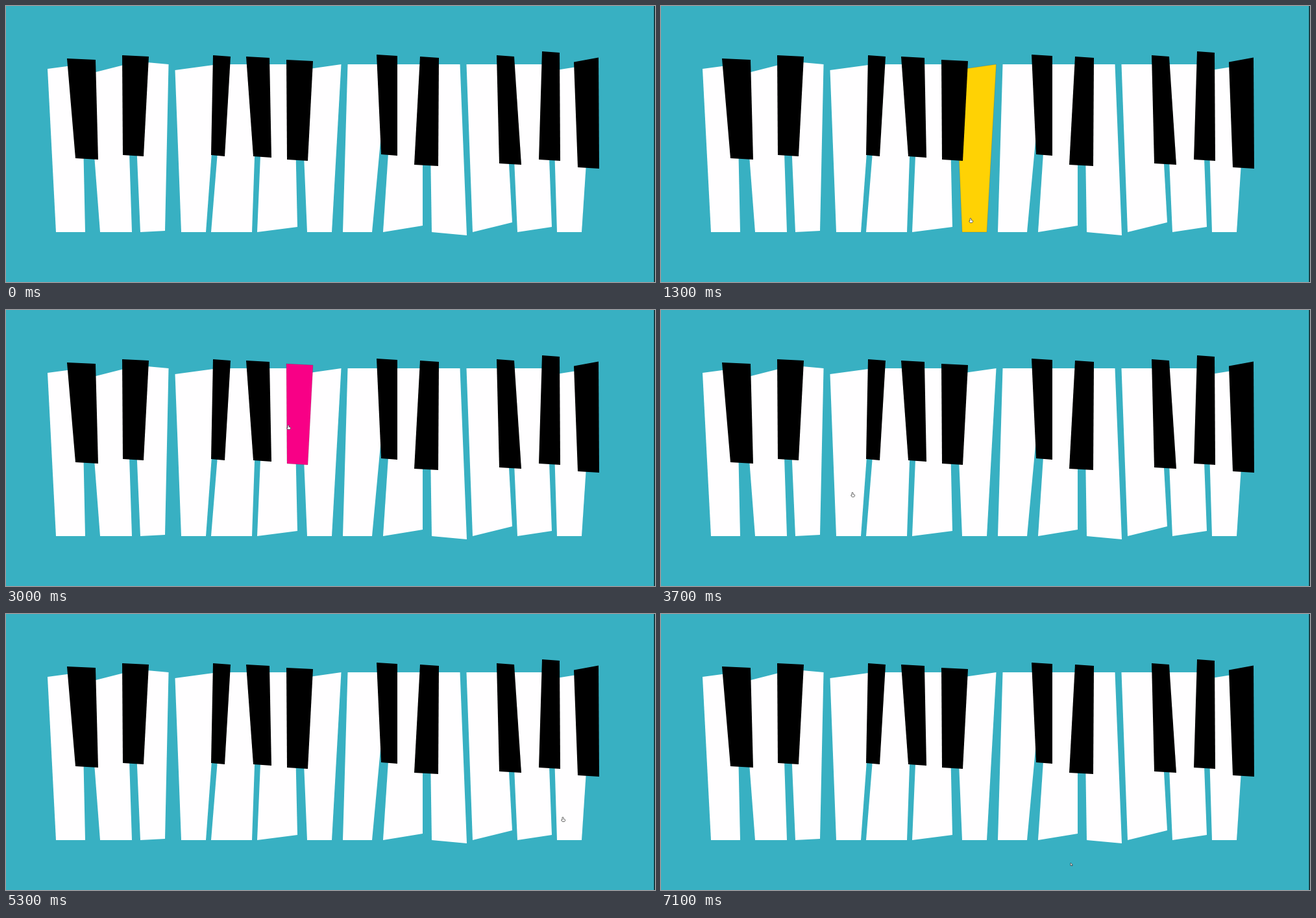
These frames come from a looping animation (1000x426 px, 7200 ms). An HTML page with a canvas:

```html
<!DOCTYPE html>
<html lang="en">
<head>
<meta charset="utf-8">
<title>Paper piano</title>
<style>
html, body { margin: 0; height: 100%; overflow: hidden; background: #38b0c2; }
canvas { display: block; }
</style>
</head>
<body>
<canvas id="stage" width="1000" height="426"></canvas>
<script>
const ctx = document.getElementById('stage').getContext('2d');
const LOOP = 7200, STEP = 100;
const TOP = 90, BOTTOM = 349, TOP_GAP = 10;

const polygon = (...points) => new Path2D(`M${points}Z`);

// Cuts between white keys: top x, bottom x, bottom gap,
// then the top and bottom tilt of the key to the right
const seams = [
  [59, 77, 0, 7],
  [121.5, 133.5, 23, 15],
  [190.5, 200.5, 13, -5, 2],
  [255.5, 257.5, 25, 9],
  [332, 312, 8],
  [393, 383, 8, 0, 8],
  [448.5, 456.5, 15, 9],
  [521.5, 510.5, 17],
  [593, 572.5, 17, 0, 10],
  [647, 649, 14, 0, -5],
  [704.5, 714.5, 9, 0, 15],
  [771.5, 784, 8, 0, 8],
  [836.5, 845, 8, 10],
  [909, 887, 0]
];

const whites = seams.slice(0, -1).map(([top, bottom, gap, tilt = 0, slant = 0], i) => {
  const [nextTop, nextBottom, nextGap] = seams[i + 1];
  return polygon(
    top + TOP_GAP / 2, TOP + tilt,
    nextTop - TOP_GAP / 2, TOP,
    nextBottom - nextGap / 2, BOTTOM - slant,
    bottom + gap / 2, BOTTOM
  );
});

// Black keys: x, y, top width, shift of the foot, foot width, top tilt
const blacks = [
  [94, 82, 44, 13, 35],
  [179, 77, 41, 1, 32],
  [319, 77, 27, -3, 21],
  [370, 79, 36, 11, 28],
  [432, 84, 41, 1, 32],
  [571, 76, 32, 7, 25],
  [638, 79, 29, -9, 37],
  [756, 77, 27, 4, 34],
  [826, 71, 27, -5, 33],
  [875, 83, 38, 6, 33, -7]
].map(([x, y, width, shift, foot, tilt = 2], i) => {
  const end = y + (i < 6 ? 154 : 167);
  return polygon(
    x, y - tilt / 2,
    x + width, y + tilt / 2,
    x + shift + foot, end + 1,
    x + shift, end - 1
  );
});

// Pointer stops: arrival time, x, y, rest, how long the pressed key glows
const stops = [
  [100, 560, 423, 0],
  [500, 477, 328, 1300, 1800],
  [2100, 450, 323, 0],
  [2700, 435, 178, 600, 800],
  [3900, 225, 334, 200, 800],
  [4300, 327, 335, 0],
  [5300, 858, 314, 700],
  [6900, 631, 384, 300]
];

const hand = new Path2D('M-1,0Q0,-1 1,0V2.5L3,3Q4,3 3.5,5L2.5,6.5H-.8L-2.5,4Q-2.5,3 -1,4Z');
const arrow = new Path2D('M0,0V4.5L1.2,3.5L2,5L2.8,4.6L2.1,3.1H3.4Z');

const keyAt = (x, y) => [...blacks, ...whites].find(key => ctx.isPointInPath(key, x, y));

function litKey(t) {
  const press = stops.find(([time, , , , glow = 0]) => t >= time && t < time + glow);
  return press && keyAt(press[1], press[2]);
}

function pointerAt(t) {
  const i = stops.findLastIndex(stop => stop[0] <= t);
  const [t0, x0, y0, rest] = stops[i];
  const [t1, x1, y1] = stops[i + 1] || [LOOP + rest, x0, y0];
  const p = Math.max(0, (t - t0 - rest) / (t1 - t0 - rest));
  return [x0 + (x1 - x0) * p, y0 + (y1 - y0) * p];
}

function drawKeys(keys, color, litColor, lit) {
  for (const key of keys) {
    ctx.fillStyle = key === lit ? litColor : color;
    ctx.fill(key);
    if (key !== lit) continue;
    ctx.setLineDash([1, 1]);
    ctx.lineWidth = 1;
    ctx.strokeStyle = 'rgba(60, 60, 60, .4)';
    ctx.stroke(key);
    ctx.setLineDash([]);
  }
}

function drawPointer(t) {
  const [x, y] = pointerAt(t);
  const shape = keyAt(x, y) ? hand : arrow;
  ctx.save();
  ctx.translate(x, y);
  ctx.lineWidth = 0.7;
  ctx.strokeStyle = '#333';
  ctx.fillStyle = '#fff';
  ctx.fill(shape);
  ctx.stroke(shape);
  ctx.restore();
}

function draw(now) {
  const t = Math.floor(now % LOOP / STEP) * STEP;
  const lit = litKey(t);
  ctx.fillStyle = '#38b0c2';
  ctx.fillRect(0, 0, 1000, 426);
  drawKeys(whites, '#fffeff', '#ffd204', lit);
  drawKeys(blacks, '#000', '#f80086', lit);
  ctx.fillStyle = '#0b2327';
  ctx.fillRect(998.5, 0, 1.5, 426);
  if (t >= stops[0][0]) drawPointer(t);
}

const start = performance.now();
function frame() {
  draw(performance.now() - start);
  requestAnimationFrame(frame);
}
frame();
</script>
</body>
</html>
```
